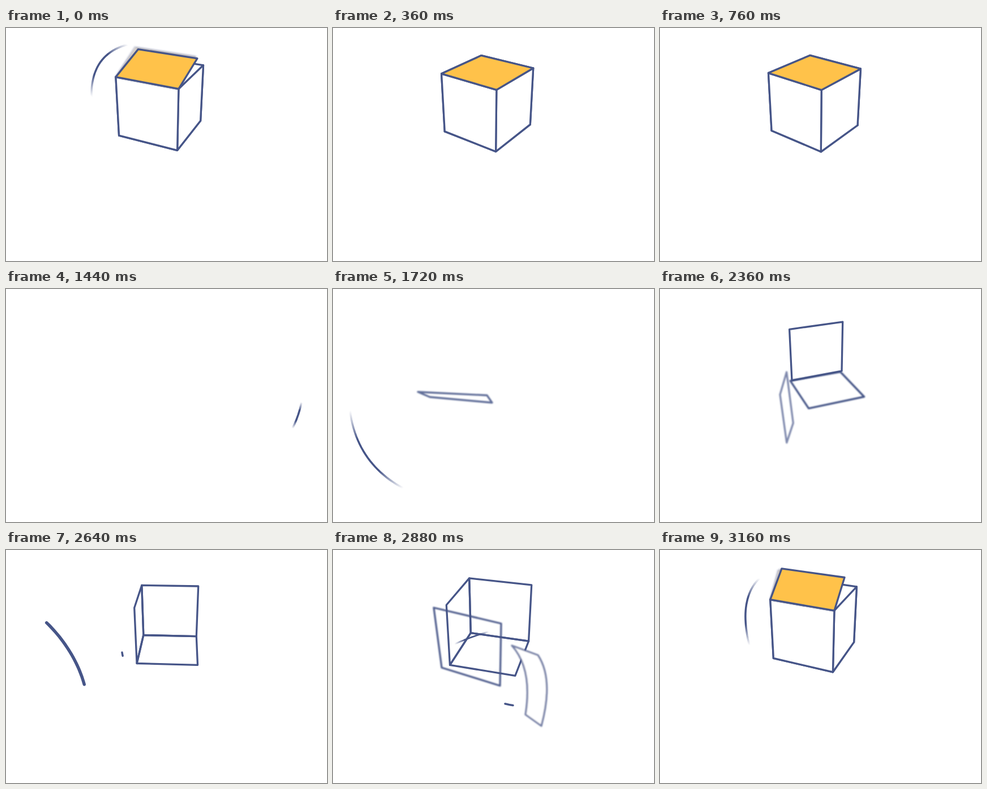
Animation of 567x412 px, one loop 3200 ms. Source, as an HTML page:

```html
<!DOCTYPE html>
<html lang="en">
<head>
<meta charset="utf-8">
<title>Box assembly</title>
<style>
  html, body { margin: 0; width: 100%; height: 100%; overflow: hidden; background: #fff; }
  svg { display: block; width: 567px; height: 412px; }
</style>
</head>
<body>
<svg viewBox="0 0 567 412">
  <defs><filter id="soft" x="-20%" y="-50%" width="140%" height="200%"><feGaussianBlur stdDeviation="0.8"/></filter></defs>
  <g id="scene" stroke-linejoin="round" stroke-linecap="round"></g>
</svg>
<script>
const LOOP = 3200, STEP = 40, HALF = 56, DISTANCE = 700;
const INK = '#465588', ORANGE = '#ffc24a', LINE = 3.3;
const scene = document.getElementById('scene');

const clamp = v => Math.max(0, Math.min(1, v));
const lerp = (a, b, k) => a + (b - a) * k;
const mix = (a, b, k) => a.map((v, i) => lerp(v, b[i], k));
const progress = (t, start, end) => clamp((t - start) / (end - start));
const easeOut = (v, power = 3) => 1 - (1 - v) ** power;
const smooth = v => v * v * (3 - 2 * v);
const rad = degrees => degrees * Math.PI / 180;
const f = v => v.toFixed(1);

// A perspective camera around the turning box; the box swells briefly as its front arrives.
function camera(t) {
  const pop = Math.exp(-(((t - 2900) / 90) ** 2));
  const settle = smooth(progress(t, 2640, 3160));
  const yaw = rad(-52 + 73 * easeOut(progress(t, 2120, 3160), 2) + 17 * easeOut(progress(t, 3120, 4020)));
  const pitch = rad(26 + 3 * pop);
  const scale = lerp(.925, 1, settle) + .09 * pop;
  const cx = lerp(299, 274, smooth(progress(t, 2120, 3200)));
  const cy = 130 - 2 * settle + 3 * pop;
  return (x, y, z) => {
    const side = x * Math.cos(yaw) - z * Math.sin(yaw);
    const depth = x * Math.sin(yaw) + z * Math.cos(yaw);
    const up = y * Math.cos(pitch) - depth * Math.sin(pitch);
    const near = y * Math.sin(pitch) + depth * Math.cos(pitch);
    const k = scale * DISTANCE / (DISTANCE - near);
    return [cx + side * k, cy - up * k];
  };
}

// Corners are named by side, height and depth: l/r, t/b, f/k.
const corner = (project, name) => project(
  name[0] === 'l' ? -HALF : HALF,
  name[1] === 't' ? HALF : -HALF,
  name[2] === 'f' ? HALF : -HALF);

// Each panel unfolds into its entry pose at one moment, then flies home.
const PANELS = [
  { home: ['ltk', 'rtk', 'rbk', 'lbk'], start: 1600, at: 1720, land: 2100, alpha: .85,
    entry: [150,182, 272,188, 281,201, 171,191], from: [-100, 30] },
  { home: ['lbk', 'rbk', 'rbf', 'lbf'], start: 2040, at: 2120, land: 2440, alpha: .42, width: 7, arch: -8,
    entry: [57,202, 168,241, 168,267, 70,224], from: [-25, -10] },
  { home: ['ltf', 'ltk', 'lbk', 'lbf'], start: 2200, at: 2340, land: 2560, alpha: .6,
    entry: [195,212, 222,172, 236,262, 210,292], from: [40, 80] },
  { home: ['rtf', 'rtk', 'rbk', 'rbf'], start: 2740, at: 2880, land: 3100, alpha: .75, bend: [25, -20], fillAt: 2700,
    entry: [316,169, 362,186, 368,311, 340,291], from: [60, 30] },
  { home: ['lbf', 'ltf', 'rtf', 'rbf'], start: 2660, at: 2880, land: 3000, alpha: .95, fillAt: 2920,
    entry: [192,208, 178,102, 297,130, 295,240], from: [-60, 20] }
];

// The tail of each streak follows its head along a cubic curve after a lag.
const STREAKS = [
  { curve: [522,200, 480,415, 60,460, 30,215], start: 1420, time: 260, lag: 110 },
  { curve: [29,215, 60,314, 140,354, 270,380], start: 1917, time: 260, lag: 68 },
  { curve: [60,118, 100,152, 130,200, 140,245], start: 2536, time: 110, lag: 93, width: 5.5, solid: true },
  { curve: [205,181, 215,250, 330,315, 437,250], start: 2628, time: 406, lag: 20, solid: true },
  { curve: [290,140, 255,150, 215,162, 172,190], start: 2748, time: 200, lag: 104, width: 2.8 },
  { curve: [172,212, 140,132, 135,43, 225,27], start: 3008, time: 200, lag: 116 }
];

function quad(p, { fill = 'none', fillOpacity = 1, alpha = 1, width = LINE, bend = [0, 0], arch = 0, soft = false } = {}) {
  const [x0, y0, x1, y1, x2, y2, x3, y3] = p;
  const curve = (ax, ay, bx, by, dx, dy) =>
    `Q${f((ax + bx) / 2 + dx)} ${f((ay + by) / 2 + dy)} ${f(bx)} ${f(by)}`;
  const d = `M${f(x0)} ${f(y0)}` + curve(x0, y0, x1, y1, 0, arch) + curve(x1, y1, x2, y2, ...bend) +
    `L${f(x3)} ${f(y3)}` + curve(x3, y3, x0, y0, ...bend) + 'Z';
  return `<path d="${d}" fill="${fill}" fill-opacity="${fillOpacity}" stroke="${INK}" ` +
    `stroke-opacity="${alpha}" stroke-width="${width}"${soft ? ' filter="url(#soft)"' : ''}/>`;
}

function panel({ home, start, at, land, entry, from, alpha, width = LINE, bend = [0, 0], arch = 0, fillAt }, t, project) {
  if (t < start) return '';
  const opening = 1 - progress(t, start, at), k = easeOut(progress(t, at, land));
  const [x0, y0, x1, y1] = entry;
  const folded = mix(entry, [x0, y0, x1, y1, x1, y1, x0, y0], opening)
    .map((v, i) => v + from[i % 2] * opening);
  return quad(mix(folded, home.flatMap(name => corner(project, name)), k), {
    fill: fillAt ? '#fff' : 'none',
    fillOpacity: fillAt ? progress(t, fillAt, fillAt + 120) : 1,
    alpha: lerp(alpha, 1, k),
    width: lerp(width, LINE, k),
    bend: mix(bend, [0, 0], k),
    arch: lerp(arch, 0, k),
    soft: k < 1
  });
}

// The lid grows from its front hinge while it swings shut.
function lidPoints(t, project) {
  const grow = progress(t, 3060, 3250), length = 2 * HALF * grow;
  const angle = rad(140 * (1 - grow) ** 1.6);
  const y = HALF + length * Math.sin(angle), z = HALF - length * Math.cos(angle);
  return [project(-HALF, y, z), project(HALF, y, z), corner(project, 'rtf'), corner(project, 'ltf')].flat();
}

function lid(t, project) {
  if (t <= 3060) return '';
  const ghosts = t < 3260 ? [14, 7].map(lag =>
    quad(lidPoints(t - lag, project), { fill: ORANGE, fillOpacity: .15, alpha: .25, soft: true })).join('') : '';
  return ghosts + quad(lidPoints(t, project), { fill: ORANGE });
}

function bezier(c, u) {
  const v = 1 - u, w = [v * v * v, 3 * v * v * u, 3 * v * u * u, u * u * u];
  return [0, 1].map(axis => w.reduce((sum, k, i) => sum + k * c[2 * i + axis], 0));
}

function streak({ curve, start, time, lag, width = 3.5, solid }, t, id) {
  const head = progress(t, start, start + time), tail = progress(t, start + lag, start + lag + time);
  if (head === tail) return '';
  const points = Array.from({ length: 25 }, (_, i) => bezier(curve, lerp(tail, head, i / 24)).map(f));
  const [x1, y1] = points[0], [x2, y2] = points[24];
  const stops = [[0, 0], [.3, 1], [.7, 1], [1, 0]].map(([at, alpha]) =>
    `<stop offset="${at}" stop-color="${INK}" stop-opacity="${alpha}"/>`).join('');
  const fade = `<linearGradient id="fade${id}" gradientUnits="userSpaceOnUse" ` +
    `x1="${x1}" y1="${y1}" x2="${x2}" y2="${y2}">${stops}</linearGradient>`;
  return (solid ? '' : fade) + `<polyline points="${points.join(' ')}" fill="none" ` +
    `stroke="${solid ? INK : `url(#fade${id})`}" stroke-width="${width}"/>`;
}

function render(ms) {
  let t = Math.floor(ms % LOOP / STEP) * STEP;
  if (t < 1400) t += LOOP;
  const project = camera(t);
  scene.setAttribute('opacity', 1 - progress(t, 4120, 4240));
  scene.innerHTML = PANELS.map(p => panel(p, t, project)).join('') +
    lid(t, project) + STREAKS.map((s, i) => streak(s, t, i)).join('');
}

const start = performance.now();
function tick() {
  render(performance.now() - start);
  requestAnimationFrame(tick);
}
tick();
</script>
</body>
</html>
```
